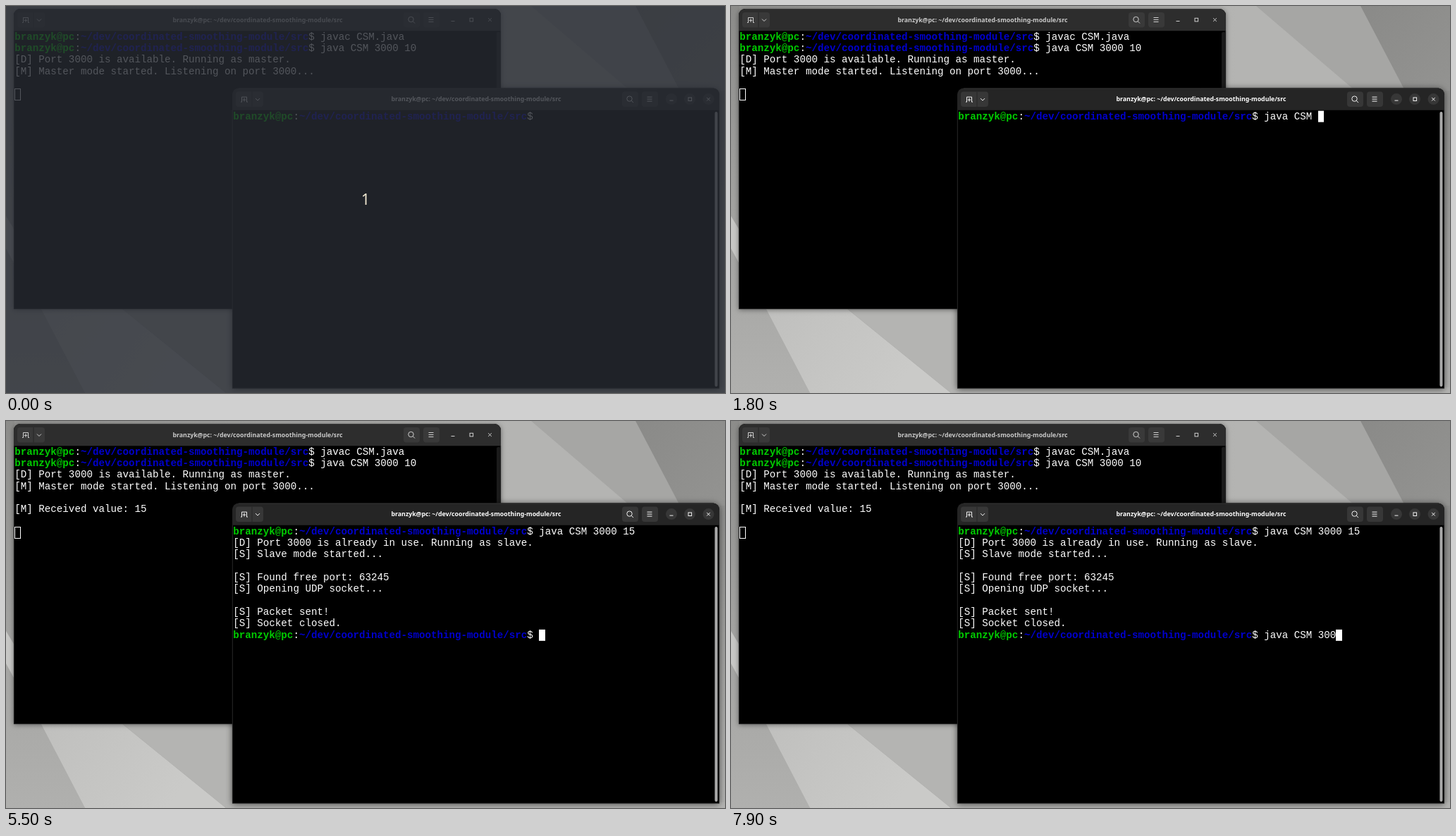
Write an HTML page with a canvas that moves like this. It is 1020 by 549 pixels and loops after 8000 ms.

```html
<!DOCTYPE html>
<html lang="en">
<head>
<meta charset="utf-8">
<title>Two terminals</title>
<style>
  html, body { margin: 0; width: 100%; height: 100%; overflow: hidden; background: #a8a8a6; }
  canvas { display: block; }
</style>
</head>
<body>
<canvas id="stage" width="1020" height="549"></canvas>
<script>
const ctx = document.getElementById('stage').getContext('2d');
const W = 1020, H = 549, LOOP = 8000;
const CELL = 8.508, ROW = 16.35, ASCENT = 11.8;
const MONO = '14.18px "Liberation Mono", monospace';
const GREEN = '#00cd00', BLUE = '#0000cd', WHITE = '#fff';

const USER = 'branzyk@pc';
const PATH = '~/dev/coordinated-smoothing-module/src';
const PROMPT_LEN = USER.length + PATH.length + 3;
const COMMAND = 'java CSM 3000 15';

// When each character of the command is typed, in ms
const FIRST_KEYS = [400, 700, 700, 800, 1100, 1400, 1500, 1600, 1800,
  2500, 2600, 2700, 3200, 3300, 3600, 3700];
const SECOND_KEYS = [6000, 6100, 6100, 6200, 6400, 6700, 6800, 6900, 7000,
  7700, 7800, 7900];
const ENTER = 4200, OUTPUT = 4300;

const REPLY = [
  '[D] Port 3000 is already in use. Running as slave.',
  '[S] Slave mode started...',
  '',
  '[S] Found free port: 63245',
  '[S] Opening UDP socket...',
  '',
  '[S] Packet sent!',
  '[S] Socket closed.'
];

const back = { x: 11, y: 4, w: 691, h: 426, textX: 12.3, textY: 35.9, active: false };
const front = { x: 321, y: 116.6, w: 691, h: 426, textX: 322.3, textY: 148.7, active: true };

function poly(fill, ...pts) {
  ctx.fillStyle = fill;
  ctx.beginPath();
  for (let i = 0; i < pts.length; i += 2) ctx.lineTo(pts[i], pts[i + 1]);
  ctx.fill();
}

function box(fill, x, y, w, h, r) {
  ctx.fillStyle = fill;
  ctx.beginPath();
  ctx.roundRect(x, y, w, h, r);
  ctx.fill();
}

function line(...pts) {
  ctx.beginPath();
  for (let i = 0; i < pts.length; i += 2) ctx.lineTo(pts[i], pts[i + 1]);
  ctx.stroke();
}

function gradient(x0, y0, x1, y1, ...colors) {
  const g = ctx.createLinearGradient(x0, y0, x1, y1);
  colors.forEach((c, i) => g.addColorStop(i / (colors.length - 1), c));
  return g;
}

function drawWallpaper() {
  ctx.fillStyle = gradient(0, 0, 720, 0, '#949492', '#a6a6a4', '#b4b4b2');
  ctx.fillRect(0, 0, W, H);
  poly(gradient(0, 0, 0, 549, '#8c8c8a', '#a2a2a0', '#b0b0ae'), 0, 0, 12, 0, 12, 430, 50, 430, 112, 549, 0, 549);
  poly('#c8c8c6', 0, 298, 12, 318, 12, 366, 0, 344);
  poly(gradient(60, 430, 230, 549, '#c0c0be', '#cacac8'), 40, 411, 142, 411, 312, 549, 112, 549);
  poly('#b4b4b2', 142, 411, 330, 411, 330, 549, 312, 549);
  poly('#a6a6a4', 745, 0, 893, 0, 958, 124, 890, 124);
  poly(gradient(893, 0, 1020, 120, '#8a8a88', '#939391'), 893, 0, W, 0, W, 240, 958, 124);
  ctx.fillStyle = gradient(0, 120, 0, H, '#8e8e8c', '#a2a2a0', '#b2b2b0');
  ctx.fillRect(1010, 120, 10, 429);
  ctx.fillStyle = '#b4b4b2';
  ctx.fillRect(321, 541, 699, 8);
}

function drawIcons(active) {
  const face = active ? '#373737' : '#393939';
  box(face, 5, 5, 39, 21.5, 4);
  box(face, 553, 5, 23, 21.5, 4);
  box(face, 581, 5, 23, 21.5, 4);
  ctx.fillStyle = '#262626';
  ctx.fillRect(27.5, 5, 1, 21.5);

  if (active) {
    for (const x of [623, 649, 675.5]) box(face, x - 8, 7.5, 16, 16, 8);
  }

  ctx.strokeStyle = active ? '#f2f2f2' : '#cfcfcf';
  ctx.lineWidth = 1;
  // new tab and its menu
  line(12, 19.5, 13.5, 19.5, 13.5, 12.5, 20.5, 12.5, 20.5, 19.5, 22, 19.5);
  line(17, 14, 17, 19);
  line(14.8, 16.5, 19.2, 16.5);
  line(33, 14.5, 36, 17.5, 39, 14.5);
  // search
  ctx.beginPath();
  ctx.arc(563.5, 15, 3.7, 0, Math.PI * 2);
  ctx.stroke();
  line(566.3, 17.8, 569, 20.5);
  // menu
  for (const y of [12.5, 15.5, 18.5]) line(588.5, y, 595.5, y);
  // minimise, maximise, close
  line(620.5, 17.5, 625.5, 17.5);
  ctx.strokeRect(647, 13.3, 4.6, 4.6);
  line(673.2, 13.3, 677.8, 17.9);
  line(677.8, 13.3, 673.2, 17.9);
}

function drawWindow(win) {
  const { x, y, w, h, active } = win;
  ctx.save();
  ctx.translate(x, y);
  ctx.shadowColor = active ? 'rgba(0,0,0,.6)' : 'rgba(0,0,0,.45)';
  ctx.shadowBlur = active ? 10 : 7;
  ctx.shadowOffsetY = 1;
  box('#000', 0, 0, w, h, [9, 9, 0, 0]);
  ctx.shadowColor = 'transparent';

  box(active ? '#252525' : '#2d2d2d', 0, 0, w, 31.2, [9, 9, 0, 0]);
  ctx.strokeStyle = '#3a3a3a';
  ctx.lineWidth = 0.7;
  line(9, 0.5, w - 9, 0.5);
  line(0.3, 31, 0.3, h - 0.3, w - 0.3, h - 0.3, w - 0.3, 31);
  drawIcons(active);

  ctx.font = 'bold 8.78px "Noto Sans", sans-serif';
  ctx.textAlign = 'center';
  ctx.fillStyle = active ? '#fff' : '#c9c9c9';
  ctx.fillText(USER + ': ' + PATH, 346, 18.8);

  if (active) box('#a9a9a9', 684.5, 33.4, 4, 390, 2);
  else box('#1b1b1b', 685, 33, 5.5, 391, 2);
  ctx.restore();
}

function write(win, row, col, text, color = WHITE, bold = false) {
  ctx.font = (bold ? 'bold ' : '') + MONO;
  ctx.textAlign = 'left';
  ctx.fillStyle = color;
  const y = win.textY + row * ROW + ASCENT;
  [...text].forEach((ch, i) => ctx.fillText(ch, win.textX + (col + i) * CELL, y));
}

function prompt(win, row, command) {
  write(win, row, 0, USER, GREEN, true);
  write(win, row, USER.length, ':');
  write(win, row, USER.length + 1, PATH, BLUE, true);
  write(win, row, PROMPT_LEN - 2, '$ ' + command);
}

function cursor(win, row, col) {
  const x = Math.round(win.textX + col * CELL);
  const right = Math.round(win.textX + col * CELL + 8.5);
  const y = win.textY + row * ROW;
  if (win.active) {
    ctx.fillStyle = WHITE;
    ctx.fillRect(x, y, right - x, 16);
  } else {
    ctx.strokeStyle = WHITE;
    ctx.lineWidth = 1;
    ctx.strokeRect(x + 0.5, Math.floor(y) + 0.5, right - x - 1, 16);
  }
}

const typed = (keys, t) => COMMAND.slice(0, keys.filter(k => k <= t).length);

function drawBackText(t) {
  prompt(back, 0, 'javac CSM.java');
  prompt(back, 1, 'java CSM 3000 10');
  write(back, 2, 0, '[D] Port 3000 is available. Running as master.');
  write(back, 3, 0, '[M] Master mode started. Listening on port 3000...');
  if (t >= OUTPUT) write(back, 5, 0, '[M] Received value: 15');
  cursor(back, t >= OUTPUT ? 7 : 5, 0);
}

function drawFrontText(t) {
  const first = typed(FIRST_KEYS, t);
  prompt(front, 0, first);
  if (t < ENTER) {
    if (t >= 300) cursor(front, 0, PROMPT_LEN + first.length);
  } else if (t < OUTPUT) {
    cursor(front, 1, 0);
  } else {
    REPLY.forEach((text, i) => write(front, i + 1, 0, text));
    const second = typed(SECOND_KEYS, t);
    prompt(front, 9, second);
    const blinkedOff = t >= 4900 && t < 5500;
    if (!blinkedOff) cursor(front, 9, PROMPT_LEN + second.length);
  }
}

function drawIntro() {
  ctx.fillStyle = 'rgba(39,43,51,.8)';
  ctx.fillRect(0, 0, W, H);
  ctx.font = '21px "Noto Sans", sans-serif';
  ctx.textAlign = 'center';
  ctx.fillStyle = '#f3ead3';
  ctx.fillText('1', 510, 282);
}

function draw(t) {
  drawWallpaper();
  drawWindow(back);
  drawBackText(t);
  drawWindow(front);
  drawFrontText(t);
  if (t < 100) drawIntro();
}

const start = performance.now();
function tick() {
  draw((performance.now() - start) % LOOP);
  requestAnimationFrame(tick);
}
tick();
</script>
</body>
</html>
```
